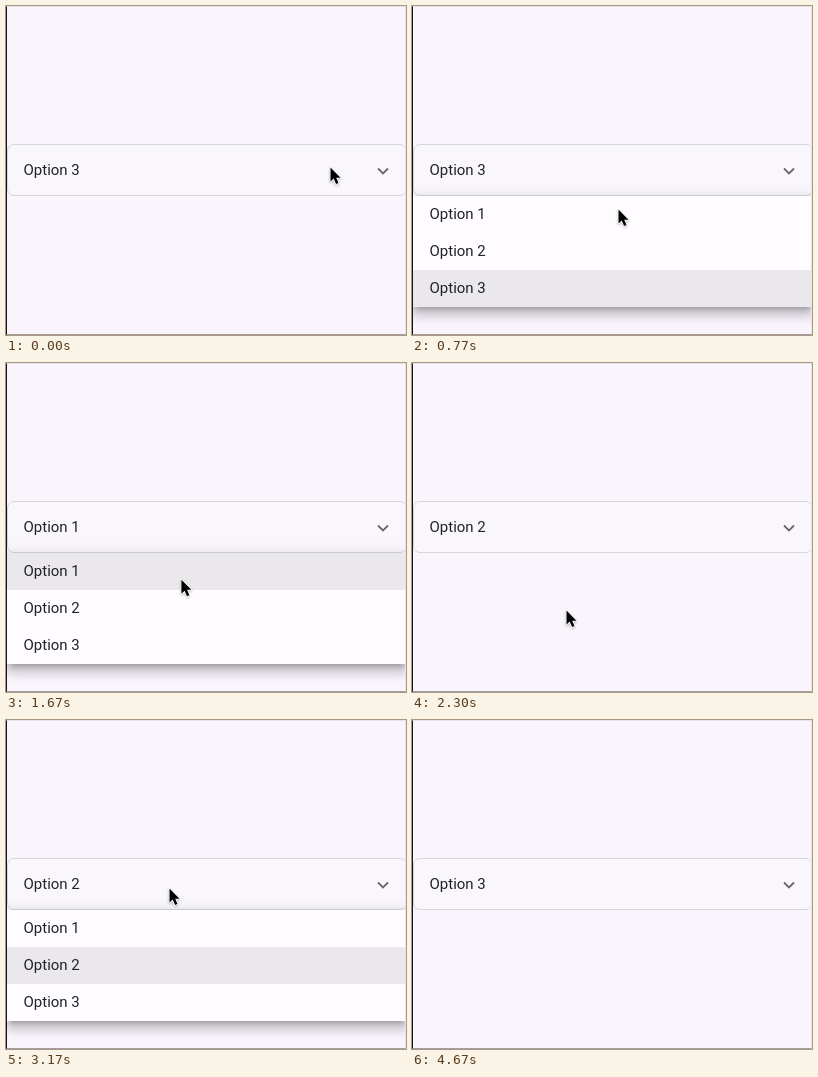
Animation, 400 px wide and 329 px high, one loop 5700 ms. Source, as an HTML page:

```html
<!DOCTYPE html>
<html lang="en">
<head>
<meta charset="utf-8">
<title>Dropdown</title>
<style>
  html, body { margin: 0; width: 100%; height: 100%; overflow: hidden; }
  body { position: relative; background: #faf4fc; color: #222124; font: 15px Roboto, sans-serif; }
  body * { box-sizing: border-box; }
  .field, .menu, .edges, .cursor { position: absolute; }
  .field {
    left: 1px; top: 137.5px; width: 400px; height: 52.5px; padding-left: 15.5px;
    line-height: 51px; background: #f9f7fb; border: 1px solid #d6d5d8; border-radius: 7px;
  }
  .chevron { position: absolute; left: 369px; top: 20px; fill: none; stroke: #69676b; stroke-width: 1.8; }
  .menu {
    left: 1px; top: 190px; width: 400px; background: #fefcff;
    box-shadow: 0 5px 5px -3px #0003, 0 8px 10px 1px #00000024, 0 3px 14px 2px #0000001f;
  }
  .menu div { height: 37px; line-height: 37px; padding-left: 16.5px; }
  .menu .selected { background: #eae8eb; }
  .edges {
    inset: 0; border: 1px solid; border-color: #e7e1e9 #e9e4eb #a19da3 #17121a;
  }
  .cursor { left: 0; top: 0; overflow: visible; filter: drop-shadow(0 1px 1px #0004); }
</style>
</head>
<body>
<div class="field"><span id="value"></span>
  <svg class="chevron" width="12" height="12"><path d="M1 3.5 6 8.5 11 3.5"/></svg>
</div>
<div class="menu" id="menu"><div>Option 1</div><div>Option 2</div><div>Option 3</div></div>
<div class="edges"></div>
<svg class="cursor" id="cursor" width="14" height="20">
  <path d="M0 0V14L3.2 11.1 5.6 16.6 8 15.5 5.7 10.2H10Z" stroke="#fff" stroke-width="1.6"
    paint-order="stroke" stroke-linejoin="round"/>
</svg>
<script>
const LOOP = 5700;
const VANISH = 4670;

const ease = {
  in: p => p * p,
  out: p => 1 - (1 - p) ** 2,
  both: p => p * p * (3 - 2 * p)
};

// [start ms, selected option, menu open]
const states = [
  [0, 3, false], [130, 3, true],
  [1000, 1, false], [1500, 1, true],
  [2300, 2, false], [3170, 2, true],
  [4300, 3, false]
];

// [start ms, end ms, end x, end y, easing]
const moves = [
  [130, 700, 208, 205, 'both'],
  [700, 770, 206.5, 203.5, 'out'],
  [1000, 1330, 186, 164, 'both'],
  [1500, 1670, 175.5, 216.5, 'both'],
  [1670, 2070, 154.5, 247.5, 'out'],
  [2300, 2700, 163.5, 168.5, 'both'],
  [3170, 3670, 84.5, 288, 'both'],
  [4440, 4640, 76, 108, 'in']
];

const value = document.getElementById('value');
const menu = document.getElementById('menu');
const cursor = document.getElementById('cursor');

function cursorAt(t) {
  let x = 324.5, y = 161.5;
  for (const [start, end, toX, toY, easing] of moves) {
    if (t < start) break;
    const p = ease[easing](Math.min(1, (t - start) / (end - start)));
    x += (toX - x) * p;
    y += (toY - y) * p;
  }
  return [x, y];
}

function draw(now) {
  const t = now % LOOP;
  const [, option, open] = states.findLast(([start]) => t >= start);
  value.textContent = `Option ${option}`;
  menu.style.display = open ? 'block' : 'none';
  [...menu.children].forEach((row, i) => row.classList.toggle('selected', i + 1 === option));

  const [x, y] = cursorAt(t);
  cursor.style.transform = `translate(${x}px, ${y}px)`;
  cursor.style.display = t < VANISH ? 'block' : 'none';
}

const begin = performance.now();
function tick() {
  draw(performance.now() - begin);
  requestAnimationFrame(tick);
}
tick();
</script>
</body>
</html>
```
